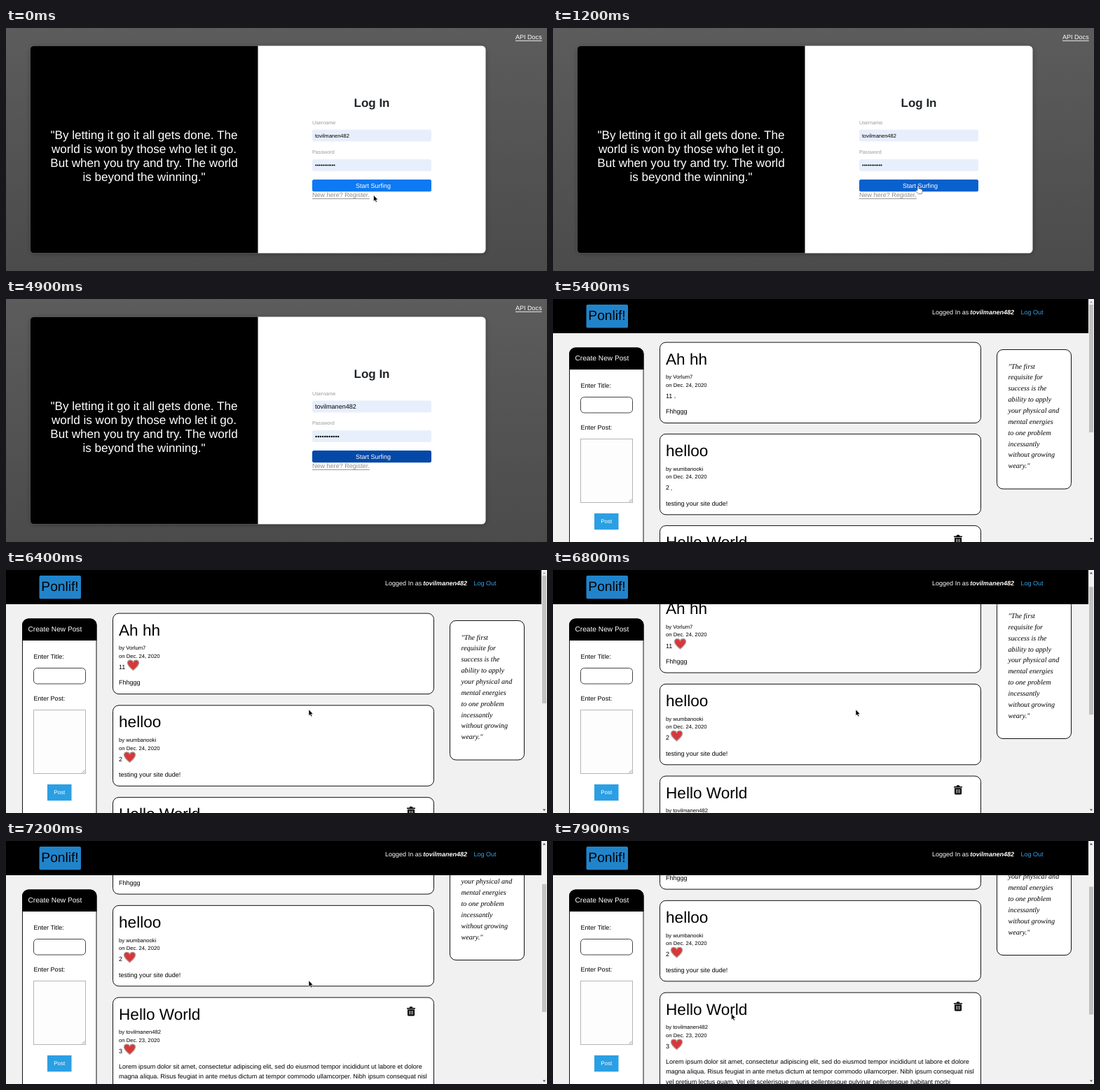
Recreate the animation shown at these times as an HTML page. Size 772 px wide and 348 px high, loop 8000 ms.

```html
<!DOCTYPE html>
<html lang="en">
<head>
<meta charset="utf-8">
<title>Log in and feed</title>
<style>
html, body { margin: 0; width: 100%; height: 100%; overflow: hidden; background: #f1f1f1; }
svg { display: block; }
text { font: 9.04px "Liberation Sans", Arial, sans-serif; dominant-baseline: central; text-rendering: geometricPrecision; }
.mid { text-anchor: middle; }
.link { text-decoration: underline; }
.quote text { font-size: 17.1px; fill: #fff; }
.label { font-size: 7.23px; fill: #999; }
.title { font-size: 22.6px; }
.meta { font-size: 7.68px; }
.motto text { font: italic 10.17px "Liberation Serif", Times, serif; }
.box { fill: #fff; stroke: #111; }
</style>
</head>
<body>
<svg width="772" height="348" viewBox="0 0 772 348">
  <defs>
    <linearGradient id="dusk" x2="0" y2="1">
      <stop stop-color="#5c5c5c"/><stop offset="1" stop-color="#4b4b4b"/>
    </linearGradient>
    <filter id="soft" x="-5%" y="-20%" width="110%" height="140%"><feGaussianBlur stdDeviation=".7"/></filter>
    <filter id="shade" x="-5%" y="-5%" width="110%" height="110%"><feGaussianBlur stdDeviation="3"/></filter>
  </defs>

  <g id="login">
    <rect width="772" height="348" fill="url(#dusk)"/>
    <text class="link" x="727" y="12.8" fill="#fff">API Docs</text>
    <rect x="35" y="27" width="650" height="296" rx="6" opacity=".3" filter="url(#shade)"/>
    <rect x="34.5" y="25.5" width="650" height="297" rx="5.5" fill="#fff"/>
    <path d="M359.5 25.5H40a5.5 5.5 0 0 0-5.5 5.5V317a5.5 5.5 0 0 0 5.5 5.5H359.5Z"/>
    <g class="quote mid" id="quote"></g>
    <text class="mid" x="522" y="107" fill="#212529" style="font-size:17px;font-weight:bold">Log In</text>
    <text class="label" x="437" y="135.2">Username</text>
    <rect x="437" y="145.5" width="170" height="17" rx="2.5" fill="#e8effc" filter="url(#soft)"/>
    <text class="field" x="441" y="154">tovilmanen482</text>
    <text class="label" x="437" y="177.7">Password</text>
    <rect x="437" y="188" width="170" height="17" rx="2.5" fill="#e8effc" filter="url(#soft)"/>
    <text class="field" x="441" y="196.5">•••••••••••</text>
    <rect id="start" x="437" y="217" width="170" height="17.3" rx="2.5"/>
    <text class="mid" x="524" y="226" fill="#fff">Start Surfing</text>
    <text class="link" x="437" y="239" fill="#8c8c8c">New here? Register.</text>
  </g>

  <g id="feed">
    <rect width="772" height="348" fill="#f1f1f1"/>
    <g id="page">
      <g id="cards"></g>
      <rect class="box" x="633.5" y="72.5" width="106" height="199.5" rx="8.5"/>
      <g class="motto" id="motto"></g>
    </g>
    <rect width="764" height="49"/>
    <rect x="47.5" y="8" width="59.5" height="33.3" rx="2" fill="#2184cb"/>
    <text class="mid" x="77" y="24.8" style="font-size:19.2px">Ponlif!</text>
    <text x="541" y="18.5" fill="#fff">Logged In as</text>
    <text x="595.3" y="18.5" fill="#fff" style="font-weight:bold;font-style:italic">tovilmanen482</text>
    <text x="667.5" y="18.5" fill="#37a0e8">Log Out</text>

    <rect class="box" x="23.5" y="70" width="105.5" height="300" rx="8.5"/>
    <path d="M23 101V78.5a9 9 0 0 1 9-9H120.5a9 9 0 0 1 9 9V101Z"/>
    <text x="31.5" y="85.5" fill="#fff" style="font-size:10.17px">Create New Post</text>
    <text x="39.5" y="124">Enter Title:</text>
    <rect x="39.5" y="140.5" width="74" height="22.5" rx="5" fill="#fff" stroke="#444"/>
    <text x="39.5" y="184">Enter Post:</text>
    <rect x="39.5" y="200.5" width="74" height="91" fill="#fdfdfd" stroke="#b5b5b5"/>
    <path d="M108.5 290.5l4-4M111 290.5l1.5-1.5" stroke="#777" stroke-width=".7"/>
    <rect x="59" y="307" width="34.5" height="23.3" fill="#2b9fe3"/>
    <text class="mid" x="76.2" y="318.7" fill="#fff" style="font-size:8px">Post</text>

    <rect x="764" width="8" height="348" fill="#f1f1f1"/>
    <rect id="thumb" x="765" y="8" width="6" height="183" fill="#c1c1c1"/>
    <path id="up" d="M765.8 5.5h4.4L768 3Z"/>
    <path d="M765.8 342.5h4.4L768 345Z" fill="#505050"/>
  </g>

  <path id="arrow" d="M0 0V9L2 7.2 3.4 10.2 4.9 9.5 3.6 6.6H6.3Z" stroke="#fff" stroke-width=".6"/>
  <path id="hand" d="M3 7V1.2q0-1.2 1-1.2t1 1.2V4.2q2-.5 2 .4 1.6-.3 1.7.6 1.5-.2 1.5 1V8.5L9.3 11.5H4.2L.6 7.5Q.3 6 1.5 6.2Z" fill="#fff" stroke="#222" stroke-width=".5"/>
</svg>
<script>
const $ = id => document.getElementById(id);
const text = (x, y, str, cls = "") => `<text class="${cls}" x="${x}" y="${y}">${str}</text>`;
const lines = (x, y, step, list) => list.map((s, i) => text(x, y + i * step, s)).join("");

$("quote").innerHTML = lines(197, 153.5, 19.9, [
  '"By letting it go it all gets done. The', "world is won by those who let it go.",
  "But when you try and try. The world", 'is beyond the winning."']);
$("motto").innerHTML = lines(649.5, 97, 15.87, [
  '"The first', "requisite for", "success is the", "ability to apply", "your physical and",
  "mental energies", "to one problem", "incessantly", "without growing", 'weary."']);

const trash = `<g transform="translate(578 20)"><path d="M-6-4.8H-2.5L-1.6-6.5H1.6L2.5-4.8H6V-3.2H-6ZM-5-2.5H5V5.2Q5 6.8 3.5 6.8H-3.5Q-5 6.8-5 5.2Z"/>
  <path d="M-2.3-.8V4.8M0-.8V4.8M2.3-.8V4.8" stroke="#fff" stroke-width=".9"/></g>`;

function card({ title, by, date, likes, body, height = 115.5, own }) {
  const x = 171.5 + 5 * likes.length;
  return `<g class="card"><rect class="box" x="152.5" y=".3" width="458" height="${height}" rx="8.5"/>` +
    text(161, 24.3, title, "title") + text(161, 50.2, "by " + by, "meta") +
    text(161, 61.6, `on Dec. ${date}, 2020`, "meta") + text(161, 77.3, likes) +
    `<text class="broken" x="${x - 9}" y="80.5" fill="#b22" style="font-size:5px">×</text>
    <path class="heart" transform="translate(${x} 74.5)" d="M0 7.3C-3.5 4.5-8-.2-8-3.2-8-8-1.8-8.6 0-4.4 1.8-8.6 8-8 8-3.2 8-.2 3.5 4.5 0 7.3Z" fill="#d9363a" stroke="#a89a98" stroke-width="1.3"/>` +
    lines(161, 99.5, 14.2, body) + (own ? trash : "") + "</g>";
}

$("cards").innerHTML = [
  { title: "Ah hh", by: "Vorlum7", date: 24, likes: "11", body: ["Fhhggg"] },
  { title: "helloo", by: "wumbanooki", date: 24, likes: "2", body: ["testing your site dude!"] },
  { title: "Hello World", by: "tovilmanen482", date: 23, likes: "3", height: 260, own: true, body: [
    "Lorem ipsum dolor sit amet, consectetur adipiscing elit, sed do eiusmod tempor incididunt ut labore et dolore",
    "magna aliqua. Risus feugiat in ante metus dictum at tempor commodo ullamcorper. Nibh ipsum consequat nisl",
    "vel pretium lectus quam. Vel elit scelerisque mauris pellentesque pulvinar pellentesque habitant morbi"] }
].map(card).join("");

// Linear interpolation through [time, ...values] keys
function track(keys, t) {
  const i = keys.findIndex(k => k[0] > t);
  if (i === 0) return keys[0].slice(1);
  if (i < 0) return keys.at(-1).slice(1);
  const a = keys[i - 1], b = keys[i], p = (t - a[0]) / (b[0] - a[0]);
  return a.slice(1).map((v, j) => v + (b[j + 1] - v) * p);
}

const arrowPath = [[0, 524.5, 239.3], [900, 524, 230], [5800, 520, 216], [6400, 432, 199.7],
  [7400, 432, 199.7], [7900, 254.5, 247]];
const handPath = [[1000, 517, 226], [1800, 517, 226], [2050, 509, 218], [2300, 516, 220], [2500, 516, 219.5]];
const scrollPath = [[6500, 0], [6600, 6], [6700, 17], [6800, 30.5], [7200, 101.5], [7400, 108.5]];
const startColor = [[900, 13, 121, 242], [1500, 4, 72, 168]];

const show = (el, on) => el.style.display = on ? "" : "none";
const move = (el, x, y) => el.setAttribute("transform", `translate(${x} ${y})`);
const all = (sel, fn) => document.querySelectorAll(sel).forEach(fn);

function draw(now) {
  const t = Math.floor(now % 8000 / 100) * 100;
  const inFeed = t >= 5400, loaded = t >= 5500;
  show($("login"), !inFeed);
  show($("feed"), inFeed);

  $("start").setAttribute("fill", `rgb(${track(startColor, t).map(Math.round)})`);
  all(".field", el => el.style.fontSize = t < 2500 ? "7.53px" : "9.04px");

  const [scroll] = track(scrollPath, t);
  move($("page"), 0, -scroll);
  all(".card", (el, i) => move(el, 0, 61.8 + i * (loaded ? 131.75 : 131.25)));
  all(".heart", el => show(el, loaded));
  all(".broken", el => show(el, !loaded));
  $("thumb").setAttribute("y", 8 + scroll * .53);
  $("up").setAttribute("fill", scroll ? "#505050" : "#a3a3a3");

  show($("arrow"), t < 1000 || t >= 5800);
  show($("hand"), t >= 1000 && t < 4700);
  move($("arrow"), ...track(arrowPath, t));
  move($("hand"), ...track(handPath, t));
}

function loop() {
  draw(performance.now());
  requestAnimationFrame(loop);
}
loop();
</script>
</body>
</html>
```
